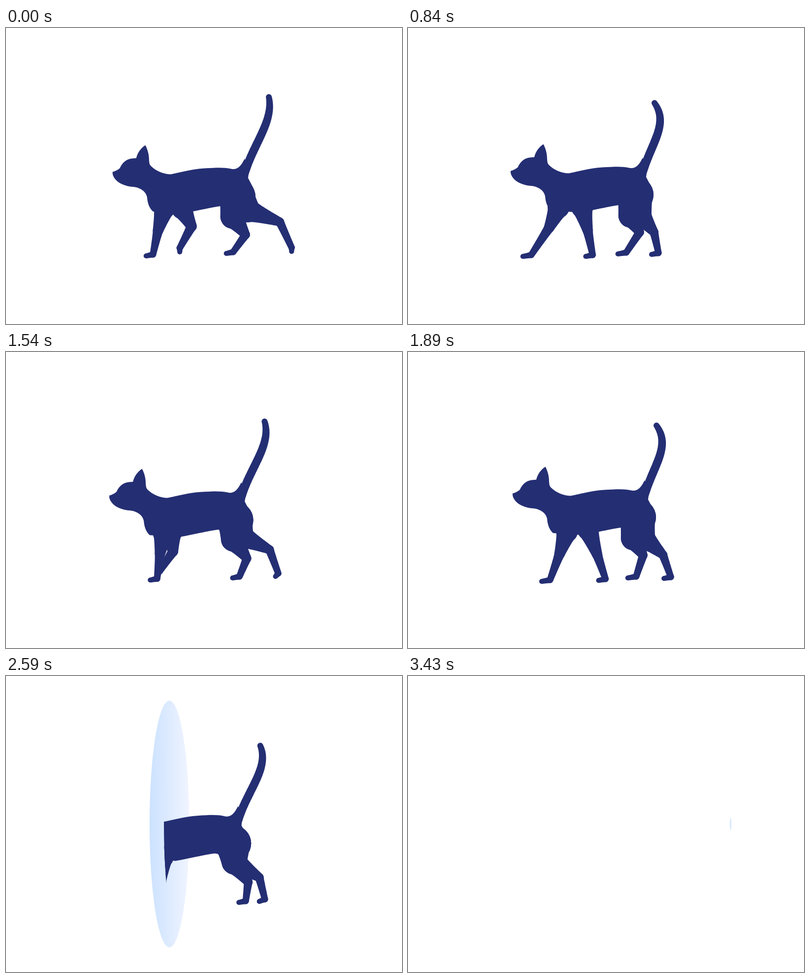
Animation of 800x600 px, one loop 3500 ms. Source, as an HTML page with a canvas:

```html
<!DOCTYPE html>
<html lang="en">
<head>
<meta charset="utf-8">
<title>Cat and portal</title>
<style>
html, body { margin: 0; height: 100%; overflow: hidden; background: #fff; }
canvas { display: block; }
</style>
</head>
<body>
<canvas id="stage" width="800" height="600"></canvas>
<script>
const ctx = document.getElementById('stage').getContext('2d');
const STEP = 70, STEPS = 50;
const HALF = 7;              // steps until the legs swap roles
const KEYS = [0, 3, 5, 6];   // key poses within half a stride

// Head, back and belly keep their shape and only shift.
const body = new Path2D(`M263 264 C266 252 273 243 281.5 237.5 C286 246 289 256 289 268
  C289.5 274 290 277 293 280 C302 289 318 296.5 333 296.5 C352 293 375 286 400 284.5
  C425 283 440 282 455 285.5 C466 288 474 282 482 265 L491 290 L489 304 L500 325 L490 371
  L436 361 C425 361 385 371 356 376 L297 372 C290 366 286 356 285 343 C283 331 270 323 257 322
  C242 321 228 315 222 308 C217 302 214.5 297 215.5 291.5 C219 291 226 288 230 284
  C235 272 245 263 263 264 Z`);

const track = (...rows) => rows.map(r => r.split(' ').map(p => p.split(',').map(Number)));

// Body shift; then, relative to it, the hip, the bend of the tail and its tip.
const trunk = track(
  '0,0 467,342 541,189 531,140', '-20,-2 474,340 548,187 525,144',
  '-8,-2 467,340 535,196 506,154', '-4,-5 468,340 535,196 506,154');

// Joints of one leg over a whole stride: four keys on the ground, four swinging.
const front = track(   // shoulder, elbow, wrist
  '320,365 307,411 297,459', '315,368 319,405 322,460',
  '352,364 363,410 373,460', '364,360 382,410 399,460',
  '356,366 375,402 351,446', '290,364 262,409 230,441',
  '304,364 285,405 249,460', '321,364 306,410 287,462');
const hind = track(    // knee, hock, ankle
  '458,382 484,419 459,454', '462,375 492,417 497,457',
  '467,375 497,414 506,456', '474,374 515,411 531,456',
  '488,369 553,393 577,445', '449,381 491,416 496,456',
  '450,380 468,414 441,455', '455,377 475,412 461,455');

const mix = (a, b, u) => a + (b - a) * u;
const keyTime = i => KEYS[i % 4] + HALF * Math.floor(i / 4);

// Points of a track, blended between the two keys around the step.
function pointsAt(rows, step) {
  const i = rows.findLastIndex((_, k) => keyTime(k) <= step);
  const u = (step - keyTime(i)) / (keyTime(i + 1) - keyTime(i));
  const next = rows[(i + 1) % rows.length];
  return rows[i].map((p, j) => p.map((v, k) => mix(v, next[j][k], u)));
}

// Fills the shape that a disc [x, y, radius] sweeps while u goes from 0 to 1.
function sweep(disc) {
  ctx.beginPath();
  for (let i = 0; i <= 90; i++) {
    const [x, y, r] = disc(i / 90);
    ctx.moveTo(x + r, y);
    ctx.arc(x, y, r, 0, Math.PI * 2);
  }
  ctx.fill();
}

function drawLeg(joints, radii, phase) {
  const swing = phase >= HALF;
  const curl = swing ? Math.max(0, 1 - (phase - HALF) / 3) : 0;
  const [x, y] = joints.at(-1);
  const chain = [...joints, [x - (swing ? 17 : 14) * (1 - curl), y + 3 + 5 * curl]];
  for (let i = 0; i < chain.length - 1; i++) {
    const [a, b] = [chain[i], chain[i + 1]];
    sweep(u => [mix(a[0], b[0], u), mix(a[1], b[1], u), mix(radii[i], radii[i + 1], u ** 0.7)]);
  }
}

function drawTail(bend, tip) {
  const pts = [[483, 292], [501, 233], bend, tip];
  sweep(u => {
    const v = 1 - u, w = [v ** 3, 3 * v * v * u, 3 * v * u * u, u ** 3];
    const along = k => pts.reduce((sum, p, i) => sum + p[k] * w[i], 0);
    return [along(0), along(1), 8.5 - 2.5 * u ** 4];
  });
}

function drawPortal(step, left) {
  if (step < 28) return;
  const s = Math.min(1, Math.max(0.05, 0.2 * Math.min(step - 28, 49 - step)));
  const fill = ctx.createLinearGradient(left, 0, left + 80 * s, 0);
  fill.addColorStop(0, '#cce2ff');
  fill.addColorStop(1, '#f0f4ff');
  ctx.fillStyle = fill;
  ctx.beginPath();
  ctx.ellipse(left + 40 * s, 300, 40 * s, 250 * s, 0, 0, Math.PI * 2);
  ctx.fill();
}

function drawCat(step, edge) {
  const pose = step % HALF;
  const [[dx, dy], hip, bend, tip] = pointsAt(trunk, pose);
  ctx.save();
  // Only what lies right of the portal's curved edge is still visible.
  ctx.beginPath();
  ctx.ellipse(edge + 40, 300, 40, 250, 0, Math.PI / 2, Math.PI * 1.5);
  ctx.lineTo(900, 50);
  ctx.lineTo(900, 550);
  ctx.clip();
  ctx.fillStyle = '#242e73';
  for (const phase of [pose, pose + HALF]) {
    drawLeg(pointsAt(front, phase), [22, 10.5, 6.5, 5], phase);
    drawLeg([[hip[0] + dx, hip[1] + dy], ...pointsAt(hind, phase)], [37, 25, 9, 6.5, 5], phase);
  }
  ctx.translate(dx, dy);
  ctx.fill(body);
  drawTail(bend, tip);
  ctx.restore();
}

function draw(ms) {
  const step = Math.floor(ms / STEP) % STEPS;
  const left = 30 * step - 820;
  ctx.clearRect(0, 0, 800, 600);
  drawPortal(step, left);
  drawCat(step, left + 29);
}

let start;
function tick(now) {
  start ??= now;
  draw(now - start);
  requestAnimationFrame(tick);
}
draw(0);
requestAnimationFrame(tick);
</script>
</body>
</html>
```
